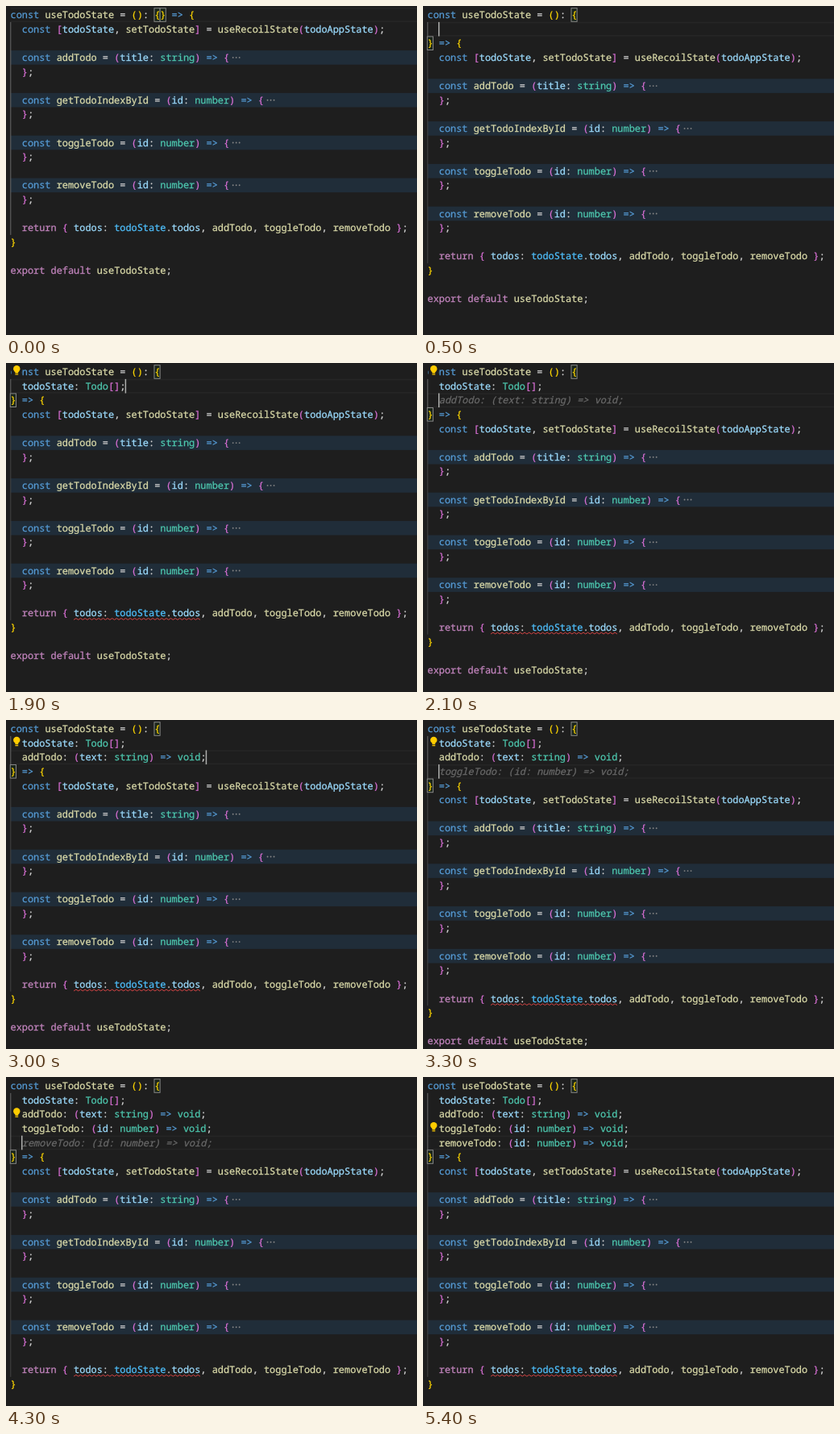
These frames come from a looping animation (510x408 px, 5.5 s). An HTML page:

```html
<!DOCTYPE html>
<html lang="en">
<head>
<meta charset="utf-8">
<title>Typing a return type</title>
<style>
html, body { margin: 0; width: 100%; height: 100%; overflow: hidden; background: #1e1e1e; }
svg { display: block; width: 510px; height: 408px; }
text {
  font: 11.91px "Noto Sans Mono", "DejaVu Sans Mono", monospace;
  text-rendering: geometricPrecision;
  fill: currentColor; stroke: currentColor; stroke-width: .25px;
}
.ghost { font-style: italic; color: #696969; }
</style>
</head>
<body>
<svg id="stage" viewBox="0 0 510 408"></svg>
<script>
const LOOP = 5500, BLINK = 500, BULB_DELAY = 200;
const LEFT = 5.5, TOP = 2.3, CHAR = 7.147, LINE = 17.6;
const stage = document.getElementById('stage');

// Each member gets a new line, then a suggestion, which is accepted.
const members = [
  { code: 'todoState: Todo[];', enter: 400, suggest: 600, accept: 1500 },
  { code: 'addTodo: (text: string) => void;', enter: 2000, suggest: 2000, accept: 2700 },
  { code: 'toggleTodo: (id: number) => void;', enter: 3300, suggest: 3300, accept: 3600 },
  { code: 'removeTodo: (id: number) => void;', enter: 4200, suggest: 4300, accept: 4900 }
];
const body = `  const [todoState, setTodoState] = useRecoilState(todoAppState);

  const addTodo = (title: string) => {
  };

  const getTodoIndexById = (id: number) => {
  };

  const toggleTodo = (id: number) => {
  };

  const removeTodo = (id: number) => {
  };

  return { todos: todoState.todos, addTodo, toggleTodo, removeTodo };`.split('\n');
const footer = ['}', '', 'export default useTodoState;'];

const brackets = ['#ffd700', '#da70d6', '#179fff'];
const palette = [
  [/^(const|=>)$/, '#569cd6'],
  [/^(return|export|default)$/, '#c586c0'],
  [/^(string|number|void|Todo)$/, '#4ec9b0'],
  [/^((add|toggle|remove)Todo|(use|set)TodoState|useRecoilState|getTodoIndexById)$/, '#dcdcaa'],
  [/^\w+$/, '#9cdcfe'],
  [/./, '#d4d4d4']
];

const colX = col => LEFT + col * CHAR;
const rowY = row => TOP + row * LINE;
const rect = (x, y, w, h, fill, extra = '') =>
  `<rect x="${x}" y="${y}" width="${w}" height="${h}" fill="${fill}" ${extra}/>`;
const text = (str, row, col, attrs) =>
  `<text x="${colX(col)}" y="${rowY(row) + 12.8}" ${attrs}>${str.replace('>', '&gt;')}</text>`;
const guide = (from, to, color) => rect(5.3, rowY(from), 1, (to - from) * LINE, color);
const matchBox = (row, col) =>
  rect(colX(col) - .2, rowY(row) + .4, CHAR, LINE - 1, '#1b251b', 'stroke="#888"');

function codeLines(lines) {
  let depth = 0;
  return lines.map((line, row) => [...line.matchAll(/\w+|=>|[^\s\w]/g)].map(({ 0: word, index }) => {
    let color = palette.find(([re]) => re.test(word))[1];
    if (line.startsWith('todoState.', index)) color = '#4fc1ff';
    if ('([{'.includes(word)) color = brackets[depth++ % 3];
    if (')]}'.includes(word)) color = brackets[--depth % 3];
    return text(word, row, index, `color="${color}"`);
  }).join('')).join('');
}

function foldedLine(row, col) {
  let out = rect(LEFT, rowY(row), 505, LINE, '#202d39');
  for (let i = 0; i < 3; i++)
    out += `<circle cx="${colX(col) + 4.6 + i * 4}" cy="${rowY(row + .5)}" r=".95" fill="#858585"/>`;
  return out;
}

function squiggle(row) {
  const y = rowY(row + 1) - 1.6;
  let points = '';
  for (let x = colX(11), side = 1; x <= colX(33); x += 2.8, side = -side) points += `${x},${y + side * .9} `;
  return `<polyline points="${points}" fill="none" stroke="#d84545"/>`;
}

function bulb(row) {
  const y = rowY(row);
  return rect(7, y + 1, 12.6, 15, '#1e1e1e') +
    `<circle cx="13.3" cy="${y + 5}" r="4.2" fill="#ffcc00"/>` +
    rect(11.4, y + 8, 3.8, 2.4, '#ffcc00') + rect(11.4, y + 11.2, 3.8, 1.2, '#ffcc00');
}

function stateAt(t) {
  const count = members.filter(m => t >= m.accept).length;
  const next = members[count], last = members[count - 1];
  const open = !!next && t >= next.enter;
  const ghost = open && t >= next.suggest;
  const hasBulb = last && t >= last.accept + BULB_DELAY && !(next && t >= next.suggest + BULB_DELAY);
  const lastEdit = ghost ? next.suggest : open ? next.enter : last ? last.accept : 100 - 2 * BLINK;
  const cursorOn = (t - lastEdit) % (2 * BLINK) < BLINK;
  return { count, open, ghost, hasBulb, cursorOn };
}

function render({ count, open, ghost, hasBulb, cursorOn }) {
  const closed = !count && !open;
  const typed = members.slice(0, count).map(m => '  ' + m.code);
  const head = closed
    ? ['const useTodoState = (): {} => {']
    : ['const useTodoState = (): {', ...typed, ...(open ? [''] : []), '} => {'];
  const start = head.length, end = start + body.length;
  const row = count + open;
  const col = closed ? 26 : open ? 2 : typed[count - 1].length;
  let out = '';

  for (const y of [rowY(row), rowY(row + 1) - 1.4]) out += rect(LEFT, y, 505, 1.4, '#262626');
  body.forEach((line, i) => {
    if (line.endsWith('{')) out += foldedLine(start + i, line.length);
  });
  out += guide(start, end, closed ? '#686868' : '#444');
  if (!closed) out += guide(1, start - 1, '#686868');
  out += matchBox(0, 25) + (closed ? matchBox(0, 26) : matchBox(start - 1, 0));
  out += codeLines([...head, ...body, ...footer]);
  if (ghost) out += text(members[count].code, row, 2, 'class="ghost"');
  if (count) out += squiggle(end - 1);
  if (hasBulb) out += bulb(count - 1);
  if (cursorOn) out += rect(colX(col) - .8, rowY(row), 1.5, LINE, '#aeafad');
  return out;
}

let shown;
function tick() {
  const state = stateAt(performance.now() % LOOP);
  const key = JSON.stringify(state);
  if (key !== shown) {
    shown = key;
    stage.innerHTML = render(state);
  }
  requestAnimationFrame(tick);
}
tick();
</script>
</body>
</html>
```
